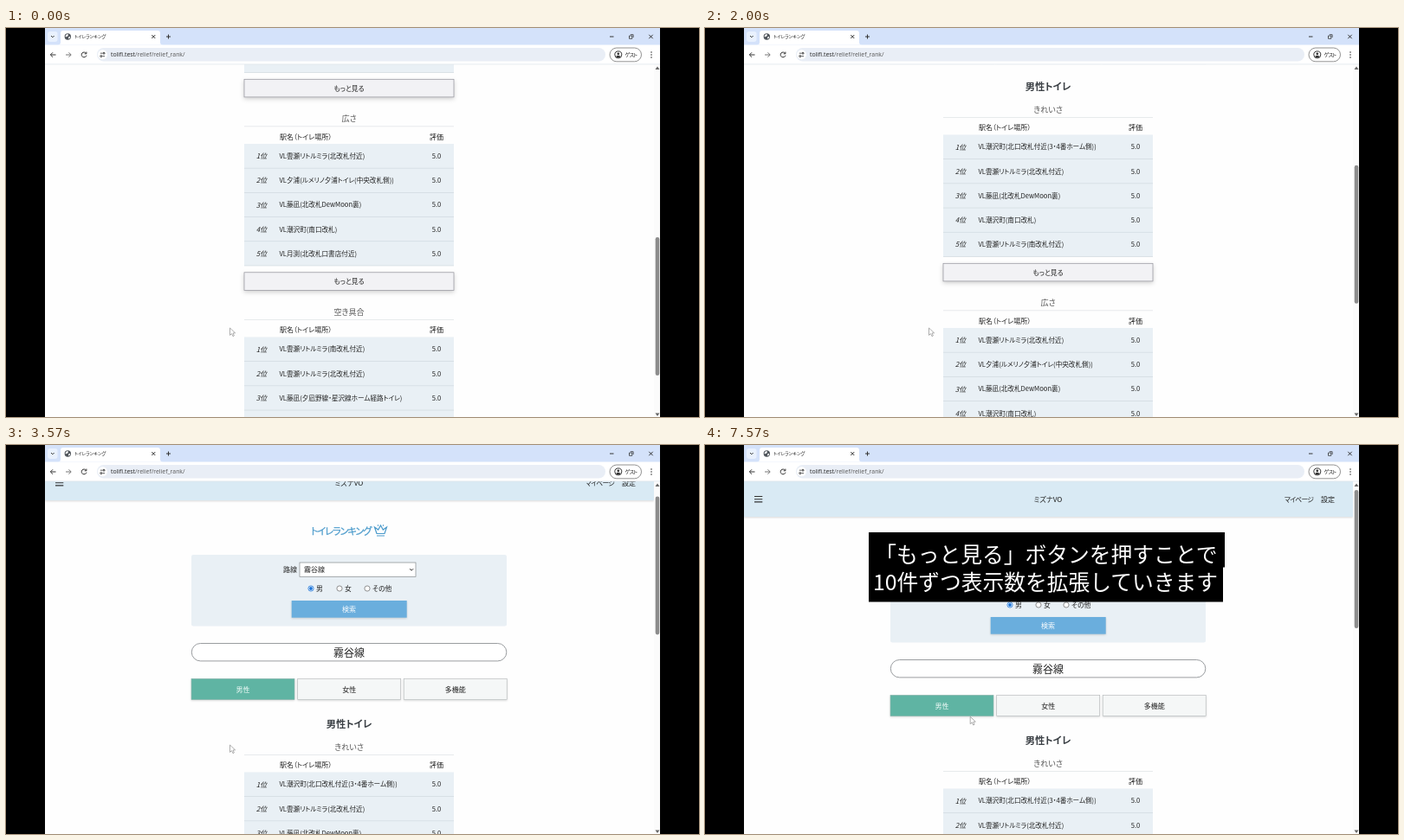
An HTML page that plays this animation: 800x450 px, repeating every 8000 ms.

```html
<!DOCTYPE html>
<html lang="ja">
<head>
<meta charset="utf-8">
<title>トイレランキング</title>
<style>
html, body { margin: 0; width: 100%; height: 100%; overflow: hidden; background: #000; }
svg { display: block; width: 800px; height: 450px; }
text { font-family: "Noto Sans CJK JP", "Noto Sans CJK", sans-serif; font-feature-settings: "palt"; fill: #222; }
.url { font-family: "Open Sans", "Noto Sans", sans-serif; }
.mid { text-anchor: middle; }
.tight { letter-spacing: -.1em; }
.title { fill: #4a9acb; stroke: #4a9acb; stroke-width: .25; }
.shade { filter: drop-shadow(0 1.5px 1.2px rgba(0, 0, 0, .15)); }
.lift { filter: drop-shadow(0 2.5px 2.5px rgba(0, 0, 0, .18)); }
.ink { fill: none; stroke: #333; stroke-width: 1; }
.caption text { fill: #fff; font-feature-settings: normal; }
.caption .kanji { font-weight: 300; }
</style>
</head>
<body>
<svg viewBox="0 0 800 450">
  <defs><clipPath id="view"><rect x="45" y="42" width="710" height="408"/></clipPath></defs>
  <rect width="800" height="450"/>
  <rect x="45" width="710" height="450" fill="#fefefe"/>
  <g clip-path="url(#view)">
    <g id="page"></g>
    <rect x="748" y="42" width="7" height="408" fill="#fbfbfb"/>
    <path d="M749.5 48l2.5-3.5 2.5 3.5zM749.5 445.5l2.5 3.5 2.5-3.5z" fill="#666"/>
    <rect id="thumb" x="749.7" y="52" width="4.6" height="160" rx="2.3" fill="#8c8c8c"/>
  </g>
  <g id="chrome"></g>
  <g id="caption" class="caption"></g>
  <path id="cursor" d="M.5 .3v8.4l2-1.8 1.5 3.1 1.4-.7-1.4-3 2.6-.2z" fill="#fff" stroke="#8c8c8c" stroke-width=".7"/>
</svg>
<script>
const $ = id => document.getElementById(id);

const text = (x, cy, size, str, attrs = '') =>
  `<text x="${x}" y="${cy + size * .375}" font-size="${size}" ${attrs}>${str}</text>`;
const mid = (x, cy, size, str, attrs = '') => text(x, cy, size, str, `class="mid" ${attrs}`);
const rect = (x, y, w, h, fill, attrs = '') =>
  `<rect x="${x}" y="${y}" width="${w}" height="${h}" fill="${fill}" ${attrs}/>`;
const path = (d, attrs = '') => `<path d="${d}" class="ink" ${attrs}/>`;

const LINE = '霧谷線';
const NORTH = 'VL雲瀬リトルミラ(北改札付近)';
const SOUTH = 'VL雲瀬リトルミラ(南改札付近)';
const SHOP = 'VL藤凪(北改札DewMoon裏)';
const GATE = 'VL潮沢町(南口改札)';
const sections = [
  ['きれいさ', 'VL潮沢町(北口改札付近(3・4番ホーム側))', NORTH, SHOP, GATE, SOUTH],
  ['広さ', NORTH, 'VL夕浦(ルメリノ夕浦トイレ(中央改札側))', SHOP, GATE, 'VL月渕(北改札口書店付近)'],
  ['空き具合', SOUTH, NORTH, 'VL藤凪(夕凪野線・星沢線ホーム経路トイレ)', GATE, SHOP]
];

function ranking([title, ...rows], i) {
  const y = 368.3 + i * 223.5;
  let out = mid(396, y, 9.1, title, 'style="fill:#555"')
    + rect(275, y + 8.7, 242, .7, '#dfe2e5')
    + text(316, y + 21, 8, '駅名（トイレ場所）') + mid(497, y + 21, 8, '評価')
    + rect(275, y + 29.2, 242, 141, '#e9f0f5');
  rows.forEach((name, n) => {
    const cy = y + 43.3 + n * 28.2;
    out += mid(295, cy, 8, n + 1 + '位', 'font-style="italic"')
      + text(315.5, cy, 7.6, name) + mid(497, cy, 7.6, '5.0')
      + rect(275, cy + 13.7, 242, .7, '#d0d9df');
  });
  return out
    + rect(275, y + 178, 242, 20.6, '#f2f2f5', 'stroke="#92929a" stroke-width=".7" class="lift"')
    + mid(396, y + 188.5, 7.8, 'もっと見る');
}

const radio = (x, label, on) =>
  `<circle cx="${x}" cy="185" r="3.1" fill="#fff" stroke="${on ? '#1a73d8' : '#777'}" stroke-width=".8"/>`
  + (on ? `<circle cx="${x}" cy="185" r="1.9" fill="#1a73d8"/>` : '')
  + text(x + 6, 185, 7.8, label);

const tab = (x, label, on) =>
  rect(x, 289.3, 119, 24.3, on ? '#5fb4a3' : '#f5f7f7',
    `class="shade" stroke="${on ? '#8fb5ad' : '#b2b6b8'}" stroke-width=".6"`)
  + mid(x + 59.5, 301.5, 8, label, on ? 'style="fill:#eefaf7"' : '');

$('page').innerHTML =
  rect(45, 20, 703, 63, '#d9eaf4', 'class="shade"')
  + path('M57 59.5h9.3M57 62.7h9.3M57 65.9h9.3', 'style="stroke-width:1.1"')
  + mid(396, 62.8, 8.2, 'ミズナVO')
  + text(669, 62.8, 7.8, 'マイページ', 'class="tight"') + text(711, 62.8, 8, '設定')
  + text(352, 118.3, 11.2, 'トイレランキング', 'class="title tight"')
  + path('M428 121.5l-2.5-7.5 4.2 3 2.8-5 2.8 5 4.2-3-2.5 7.5zM428 124h9M429 111.5l1 1M436 111.5l-1 1',
    'style="stroke:#4a9acb;stroke-width:1.2"')
  + rect(214, 146, 364, 82.5, '#e9f0f5', 'rx="2"')
  + text(320, 163.3, 8, '路線')
  + rect(339, 155, 134, 16.3, '#fff', 'stroke="#85898c" stroke-width=".7"')
  + text(344, 163.3, 8, LINE) + path('M466.2 162.2l2 2 2-2')
  + radio(352, '男', true) + radio(385, '女') + radio(417, 'その他')
  + rect(329.7, 199, 133, 19.7, '#6aaedd', 'class="shade"')
  + mid(396, 209, 8, '検索', 'style="fill:#fff"')
  + rect(214.3, 248.5, 363.5, 20.4, '#fff', 'rx="10.2" stroke="#808488" stroke-width=".8"')
  + mid(396, 259, 12, LINE)
  + tab(214, '男性', true) + tab(336.7, '女性') + tab(459.2, '多機能')
  + mid(396, 341.8, 11.3, '男性トイレ', 'font-weight="600" style="fill:#3a3f44"')
  + sections.map(ranking).join('');

$('chrome').innerHTML =
  rect(45, 0, 710, 20, '#d4e2fa')
  + rect(48, 4, 11.5, 12, '#e9f1fe', 'rx="3"') + path('M52 9l1.8 1.8L55.6 9')
  + '<path d="M60 19.5q3 0 3-3V6q0-3 3-3h109q3 0 3 3v10.5q0 3 3 3z" fill="#fff"/>'
  + '<circle cx="71.3" cy="10" r="3.7" fill="#50555b"/>'
  + '<path d="M69 8.3l2-1.5 1 1.5-1.5 1.7-2 .3zM72 10.5l2-.8v1.8l-1.7 1.2z" fill="#fff"/>'
  + text(79, 10, 5.2, 'トイレランキング')
  + path('M168.3 8l4 4m0-4l-4 4M187.5 7.5v5M185 10h5M697 10h4.5M742.3 7.8l4.4 4.4m0-4.4l-4.4 4.4')
  + path('M719.5 9v3.3h3.3V9zM720.8 7.7h3.3V11', 'style="stroke-width:.8"')
  + rect(45, 19.5, 710, 22.5, '#fff') + rect(45, 41.6, 710, .7, '#d9e0e8')
  + path('M57.5 31H51.5M54 28.3L51.3 31l2.7 2.7')
  + path('M69 31h6M72.5 28.3l2.7 2.7-2.7 2.7', 'style="stroke:#777"')
  + path('M92.5 29.3a2.9 2.9 0 1 0 .4 2.4M92.9 27.6v2.2h-2.2')
  + rect(105, 23, 587, 15.6, '#e9eef6', 'rx="7.8"')
  + '<circle cx="111.5" cy="30.8" r="5.5" fill="#fff"/>'
  + path('M108.8 29.2h2.6M114 32.6h-2.6', 'style="stroke-width:.8"')
  + '<circle cx="113" cy="29.2" r="1" class="ink"/><circle cx="109.8" cy="32.6" r="1" class="ink"/>'
  + text(121, 30.8, 6.9, 'tolifi.test<tspan fill="#555">/relief/relief_rank/</tspan>', 'class="url"')
  + rect(697, 23, 36.5, 15.8, '#fff', 'rx="7.9" stroke="#777" stroke-width=".8"')
  + '<circle cx="706.8" cy="30.9" r="4" class="ink"/><circle cx="706.8" cy="29.8" r="1.4" fill="#333"/>'
  + '<path d="M704 33q2.8-2.6 5.6 0-2.8 2.6-5.6 0" fill="#333"/>'
  + text(714.5, 30.9, 6, 'ゲスト', 'class="tight"')
  + [28, 31, 34].map(y => `<circle cx="745" cy="${y}" r=".8" fill="#333"/>`).join('');

const thin = str => str.replace(/[\u4e00-\u9fff]+/g, '<tspan class="kanji">$&</tspan>');
$('caption').innerHTML =
  rect(189, 101, 411, 40.5, '#000') + rect(189, 141, 409, 40.5, '#000')
  + mid(394, 126.5, 24.75, thin('「もっと見る」ボタンを押すことで'))
  + mid(393, 158.7, 24.75, thin('10件ずつ表示数を拡張していきます'));

const TICK = 1000 / 7, LOOP = 8000, CAPTION_TICK = 45;
const scrollKeys = [[2, 487], [7, 389], [14, 274], [20, 190], [23, 60], [24, 60], [25, 19], [26, 9], [28, 0]];
const cursorKeys = [[31, 258, 346.7], [39, 299, 309], [41, 304, 305], [43, 305, 308.7], [44, 305, 308.7], [53, 305.7, 314]];

function sample(keys, tick) {
  const next = keys.findIndex(k => k[0] > tick);
  if (next === 0) return keys[0].slice(1);
  if (next < 0) return keys[keys.length - 1].slice(1);
  const a = keys[next - 1], b = keys[next];
  const p = (tick - a[0]) / (b[0] - a[0]);
  return a.slice(1).map((v, i) => v + (b[i + 1] - v) * p);
}

function draw(now) {
  const tick = Math.floor((now % LOOP + 5) / TICK);
  const [scroll] = sample(scrollKeys, tick);
  const [x, y] = sample(cursorKeys, tick);
  $('page').setAttribute('transform', `translate(0 ${-scroll})`);
  $('thumb').setAttribute('y', 52 + scroll * .39);
  $('cursor').setAttribute('transform', `translate(${x} ${y})`);
  $('caption').setAttribute('visibility', tick >= CAPTION_TICK ? 'visible' : 'hidden');
}

const start = performance.now();
(function loop() {
  draw(performance.now() - start);
  requestAnimationFrame(loop);
})();
</script>
</body>
</html>
```
